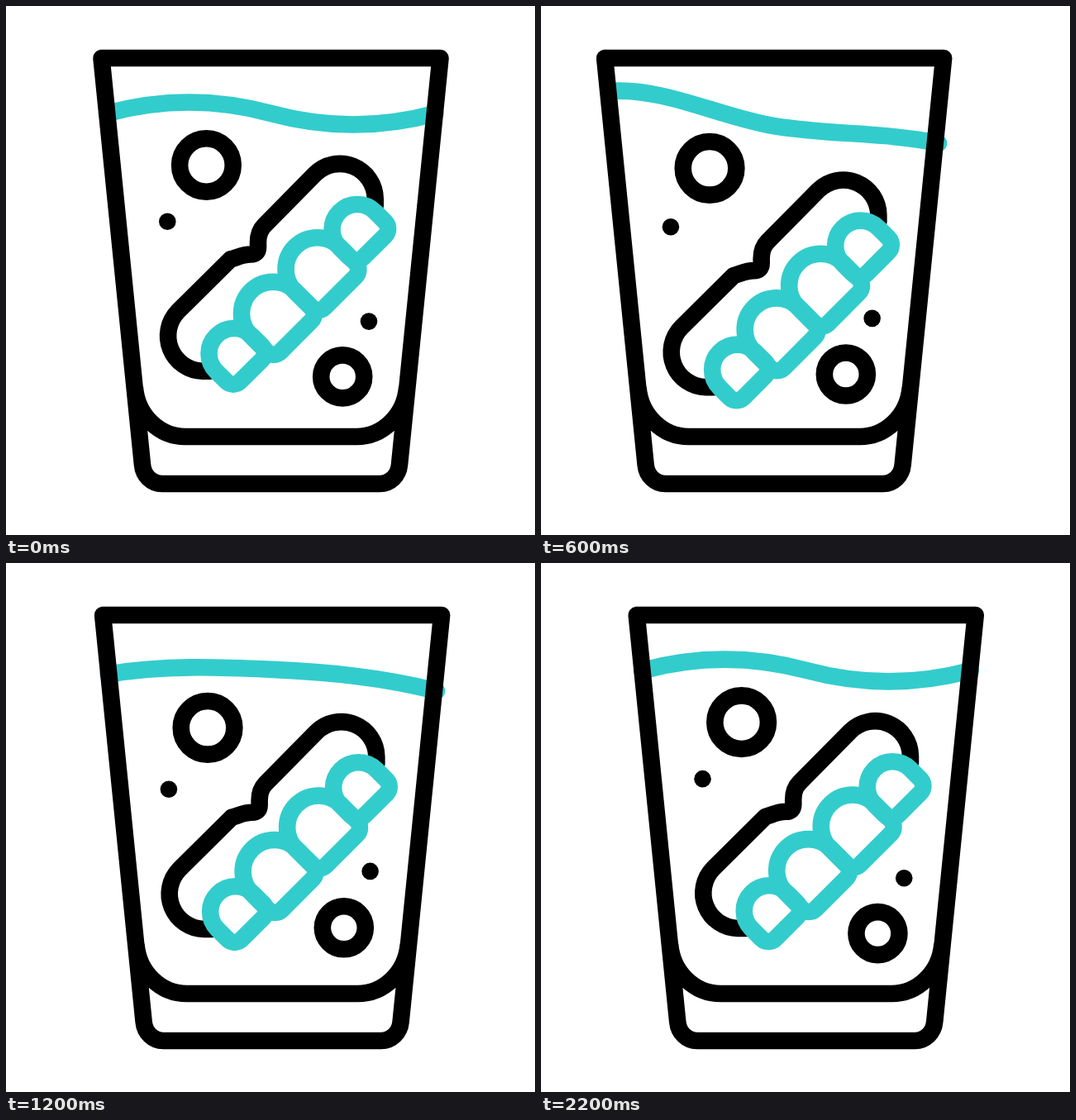
Animation, 640 px wide and 640 px high, one loop 2.24 s. Source, as an HTML page with a canvas:

```html
<!DOCTYPE html>
<html lang="en">
<head>
<meta charset="utf-8">
<title>Denture glass</title>
<style>
html, body { margin: 0; width: 100%; height: 100%; overflow: hidden; background: #fff; }
canvas { display: block; width: 100vw; height: 100vh; }
</style>
</head>
<body>
<canvas id="stage" width="640" height="640"></canvas>
<script>
const ctx = document.getElementById('stage').getContext('2d');
const LOOP = 2240, STEP = 40, LINE = 20.6;
const BLACK = '#000', TEAL = '#33cccc';

// Key times of the shaking, the denture's bobbing and the water's sway
const SHAKE = [0, 360, 678, 1042, 1400, 1770, LOOP];
const BOB = [0, 360, 710, 1035, 1400, 1768, LOOP];
const FLOAT = [0, 525, 1115, 1680, LOOP];
const SWAY = [0, LOOP / 3, LOOP * 2 / 3, LOOP];

const SLIDE = [0, 44, -53, 21, -26, 11, 0];

// Heights of the seven evenly spaced control points of the surface
const CALM = [130, 112, 112, 130, 148, 148, 130];
const TILT = [100, 97, 137, 147, 157, 153, 170];
const DOME = [152.5, 137, 120, 119.5, 119, 130, 147];
const WAVES = [CALM, TILT, DOME, CALM];

const smooth = u => u * u * (3 - 2 * u);

// Segment index and eased progress at time t
function locate(times, t) {
  let i = 0;
  while (i < times.length - 2 && t >= times[i + 1]) i++;
  return [i, smooth((t - times[i]) / (times[i + 1] - times[i]))];
}

function at(times, values, t) {
  const [i, p] = locate(times, t);
  return values[i] + (values[i + 1] - values[i]) * p;
}

function pen(color) {
  ctx.strokeStyle = ctx.fillStyle = color;
}

function ring(x, y, r) {
  ctx.beginPath();
  ctx.arc(x, y, r, 0, Math.PI * 2);
  ctx.stroke();
}

function dot(x, y) {
  ctx.beginPath();
  ctx.arc(x, y, 10.3, 0, Math.PI * 2);
  ctx.fill();
}

function water(t) {
  const [i, p] = locate(SWAY, t);
  const y = WAVES[i].map((a, n) => a + (WAVES[i + 1][n] - a) * p);
  const x = n => 122 + n * 66.25;
  pen(TEAL);
  ctx.beginPath();
  ctx.moveTo(x(0), y[0]);
  for (const n of [1, 4]) {
    ctx.bezierCurveTo(x(n), y[n], x(n + 1), y[n + 1], x(n + 2), y[n + 2]);
  }
  ctx.stroke();
}

const glassPath = new Path2D(
  'M115.5 63H525.5L476 555C474.8 568 465 578 452 578H189C176 578 166.2 568 165 555Z' +
  'M155.9 462C159 496 186 521 217 521H424C455 521 482 496 485.1 462');

const gumPath = new Path2D(
  'M446.7 242V233A42.7 42.7 0 0 0 374 203.2L312.5 265.5C307 271 305 279 305 286' +
  'V292Q305 300.5 296 300.5C287 300.5 280 304 274 309.5L207.8 369A42.7 42.7 0 0 0 238 441.7H247'
    .replace('274 309.5L207.8 369', '271.5 306.5L208.2 369.2'));

function tooth(x, y, r, h) {
  ctx.save();
  ctx.translate(x, y);
  ctx.rotate(-Math.PI / 4);
  ctx.beginPath();
  ctx.moveTo(-r, 0);
  ctx.arc(0, 0, r, Math.PI, 0);
  ctx.arcTo(r, h, 0, h, 12);
  ctx.arcTo(-r, h, -r, 0, 12);
  ctx.closePath();
  ctx.stroke();
  ctx.restore();
}

function denture(dy) {
  ctx.save();
  ctx.translate(0, dy);
  pen(BLACK);
  ctx.stroke(gumPath);
  pen(TEAL);
  tooth(276, 420.5, 30.5, 29);
  tooth(323.2, 372, 38.2, 39);
  tooth(376.7, 318.4, 38.2, 39);
  tooth(425, 270.5, 30.5, 29);
  ctx.restore();
}

function bubbles(t) {
  const bob = (a, b, c) => at(BOB, [0, a, 0, b, 0, c, 0], t);
  pen(BLACK);
  ring(242.4, 192.5 + bob(16.5, 12, 11), 32.3);
  dot(195.3, 260.7 + bob(27.7, 22.7, 22.7));
  dot(439, 381.6 - bob(16, 15.2, 15.2));
  ring(407.2, 448.4 - bob(12.2, 12.4, 11.6), 26);
}

function draw(t) {
  ctx.setTransform(1, 0, 0, 1, 0, 0);
  ctx.fillStyle = '#fff';
  ctx.fillRect(0, 0, 640, 640);
  ctx.lineWidth = LINE;
  ctx.lineCap = ctx.lineJoin = 'round';
  ctx.translate(at(SHAKE, SLIDE, t), 0);
  water(t);
  pen(BLACK);
  ctx.stroke(glassPath);
  bubbles(t);
  denture(at(FLOAT, [0, 20.5, 0, 20.5, 0], t));
}

const start = performance.now();
function tick() {
  const t = (performance.now() - start) % LOOP;
  draw(Math.floor(t / STEP) * STEP);
  requestAnimationFrame(tick);
}
tick();
</script>
</body>
</html>
```
